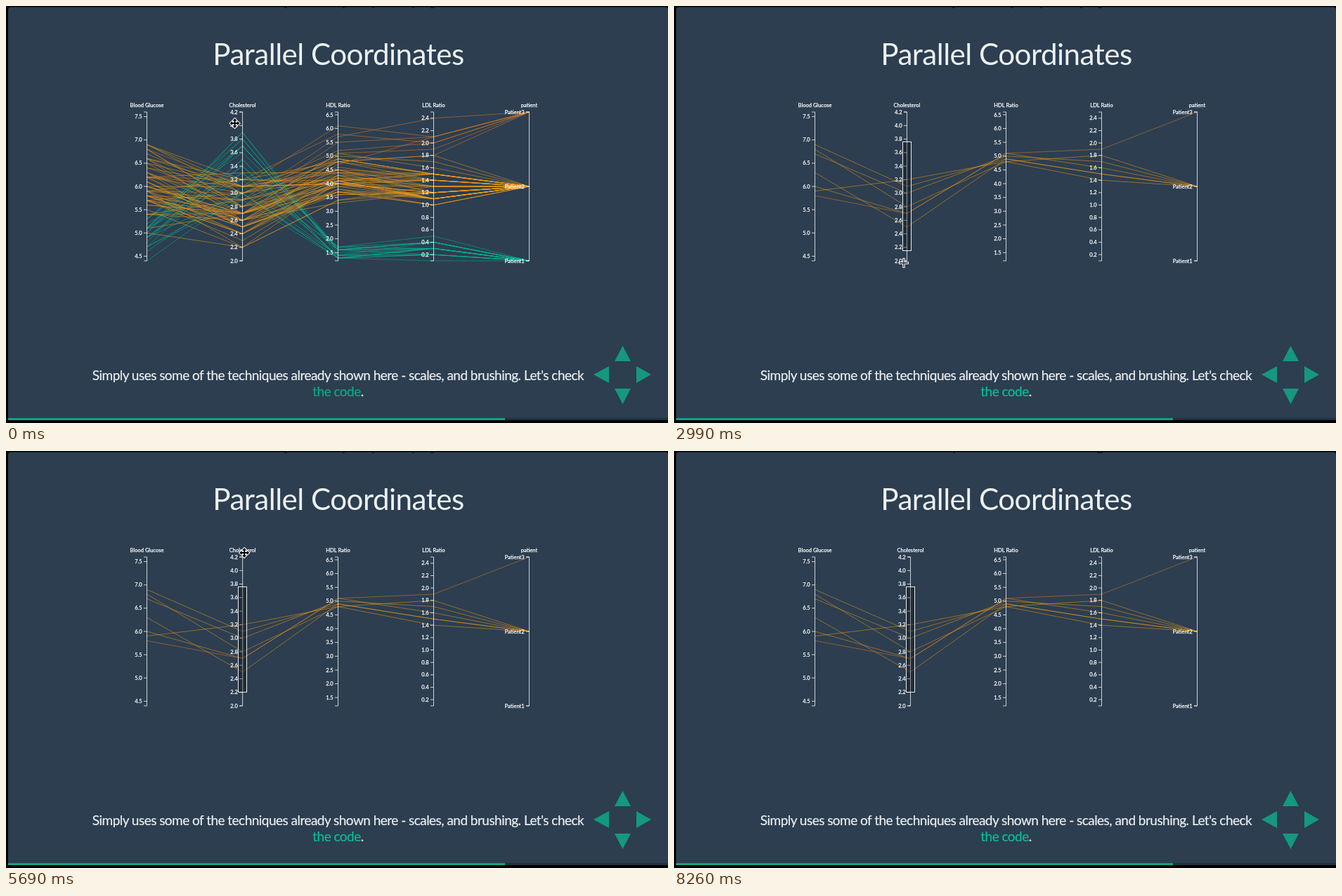
Animation of 942x594 px, one loop 8360 ms. Source, as an HTML page:

```html
<!DOCTYPE html>
<html lang="en">
<head>
<meta charset="utf-8">
<title>Parallel Coordinates</title>
<style>
  html, body { margin: 0; width: 100%; height: 100%; overflow: hidden; background: #000; }
  svg { display: block; width: 942px; height: 594px; font-family: Lato, sans-serif; fill: #fff; }
  .title, .note { letter-spacing: -.544px; fill: #ecf0f1; text-anchor: middle; }
  .title { font-size: 42.2px; }
  .note { font-size: 19.05px; stroke: #ecf0f1; stroke-width: .2; }
  .axis { font-size: 7.56px; text-anchor: end; }
  .axis text { stroke: #fff; stroke-width: .25; }
  .axis .name { text-anchor: middle; }
  .axis path { fill: none; stroke: #fff; stroke-opacity: .85; stroke-width: .9; }
  .lines path { fill: none; stroke-width: .76; stroke-opacity: .68; }
  .brush { fill: #000; fill-opacity: .3; stroke: #fff; stroke-opacity: .9; shape-rendering: crispEdges; }
  .nav { fill: #15987f; }
  .scrap { fill: none; stroke: #0b1017; stroke-width: 1; }
</style>
</head>
<body>
<svg viewBox="0 0 942 594">
  <rect x="3" y="1.5" width="939" height="588.5" rx="4" fill="#2c3e50"/>
  <path id="scrapA" class="scrap" d="M396 2.5h4M479 2.5h3M521 2.5h3M578 2.5h3M604 2.5h5"/>
  <path id="scrapB" class="scrap" d="M397 2.5h3M602 2.5h8"/>
  <path d="M3 587H942V590H3Z" fill="#222f3d"/>
  <path d="M3 587H710V590H3Z" fill="#16a085"/>
  <text class="title" x="473" y="84">Parallel Coordinates</text>
  <g id="lines" class="lines"></g>
  <g id="axes"></g>
  <text class="note" x="472.5" y="533">Simply uses some of the techniques already shown here - scales, and brushing. Let's check</text>
  <text class="note" x="472.5" y="556"><tspan id="link">the code</tspan>.</text>
  <path class="nav" d="M877.5 484L889 506H866ZM877.5 567L889 545H866ZM836 525L858 513V537ZM918 525L897 513V537Z"/>
  <g id="cursor">
    <path id="move" fill="#000" stroke="#fff" stroke-width="2" paint-order="stroke" stroke-linejoin="round"
      d="M0-7L3-3.6H1V-1H3.6V-3L7 0L3.6 3V1H1V3.6H3L0 7L-3 3.6H-1V1H-3.6V3L-7 0L-3.6-3V-1H-1V-3.6H-3Z"/>
    <g id="cross" fill="none">
      <path d="M0-7V7M-7 0H7" stroke="#fff" stroke-width="3.4"/>
      <path d="M0-6V6M-6 0H6" stroke="#1c2732" stroke-width="1.3"/>
    </g>
    <path id="arrow" fill="#000" stroke="#fff" d="M0 0V14L3.2 11L5.6 16.4L8 15.3L5.7 10.2H10Z"/>
  </g>
</svg>
<script>
const LOOP = 8360, TOP = 151, BOTTOM = 363, HOME = 336.5;
const BRUSH_TOP = 193, BRUSH_MAX = 348, BRUSH_LAG = 104, LINE_LAG = 60;
const FILTERED = 1120, RESIZED = 4560;
const $ = id => document.getElementById(id);
const clamp = (v, lo, hi) => Math.min(hi, Math.max(lo, v));

function add(parent, tag, attrs, text) {
  const el = document.createElementNS("http://www.w3.org/2000/svg", tag);
  for (const k in attrs) el.setAttribute(k, attrs[k]);
  if (text) el.textContent = text;
  return parent.appendChild(el);
}

// name, domain, first tick, tick step
const dims = [
  ["Blood Glucose", 4.4, 7.6, 4.5, .5],
  ["Cholesterol", 2, 4.2, 2, .2],
  ["HDL Ratio", 1.2, 6.6, 1.5, .5],
  ["LDL Ratio", .1, 2.5, .2, .2],
  ["patient", 1, 3, 1, 1]
];
const xs = dims.map((d, i) => 200.5 + 136 * i);
const yOf = (i, v) => BOTTOM - (v - dims[i][1]) / (dims[i][2] - dims[i][1]) * (BOTTOM - TOP);

let seed = 11;
const rnd = () => (seed = (seed * 16807) % 2147483647) / 2147483647;

// Rows spread evenly over the given ranges, with jitter
function group(n, patient, ranges) {
  return Array.from({ length: n }, (_, i) => {
    const size = i / (n - 1);
    const row = ranges.map(([lo, hi]) => Math.round((lo + (hi - lo) * (size + rnd()) / 2) * 10) / 10);
    return [...row, patient];
  });
}
// Rows that stay after filtering
const kept = [
  [5.9, 3.2, 4.8, 1.8, 2], [6.9, 3.1, 4.9, 1.5, 2], [6.7, 3, 5, 1.7, 2], [6.8, 2.8, 4.8, 1.4, 2],
  [6, 2.7, 5.1, 1.6, 2], [6.3, 2.5, 4.9, 1.5, 2], [5.8, 2.7, 5.1, 1.9, 3]
];
const rows = [
  ...group(21, 1, [[4.4, 5.5], [2.7, 4.2], [1.2, 1.8], [.1, .5]]),
  ...group(43, 2, [[4.8, 7], [2, 3.4], [3.2, 4.9], [.9, 1.6]]),
  ...group(7, 3, [[4.9, 7.6], [2.5, 3.3], [4.5, 6.6], [1.7, 2.5]]),
  ...kept
];
const colors = ["", "#00b894", "#f39c12", "#e67e22"];
const lines = rows.map(row => ({
  row,
  stays: kept.includes(row),
  y: yOf(1, row[1]),
  el: add($("lines"), "path", { stroke: colors[row[4]] })
}));

const axes = dims.map(([name, lo, hi, first, step], i) => {
  const g = add($("axes"), "g", { class: "axis", transform: `translate(${xs[i]})` });
  let d = `M-4.5 ${TOP}H0V${BOTTOM}H-4.5`;
  for (let v = first; v <= hi + .001; v += step) {
    const y = yOf(i, v);
    d += `M-4.5 ${y}H0`;
    add(g, "text", { x: -6.8, y: y + 2.6 }, i < 4 ? v.toFixed(1) : "Patient" + v);
  }
  add(g, "path", { d });
  add(g, "text", { class: "name", x: 0, y: 144 }, name);
  return g;
});
const brush = add(axes[1], "rect", { class: "brush", x: -6, y: BRUSH_TOP, width: 12 });

// Pointer glides: start, end, x, y
const glides = [
  [0, 210, 335, 167], [590, 830, 332, 163], [1120, 1440, 332, 193], [1440, 2270, 340, 352],
  [2270, 2810, 338, 366], [2900, 3250, 295.5, 366], [3600, 3900, 337, 349], [4320, RESIZED, 340, 343],
  [RESIZED, 5150, 334, 145], [5390, 5690, 339, 145], [5690, 6250, 424, 146], [6450, 6540, 445, 150],
  [6540, 7330, 912, 404]
];
function pointer(t) {
  let x = 325.5, y = 167;
  for (const [a, b, toX, toY] of glides) {
    const p = clamp((t - a) / (b - a), 0, 1);
    x += (toX - x) * p;
    y += (toY - y) * p;
  }
  return { x, y };
}

// Axis follows the pointer while held, then eases home
const drags = [[1440, 3600], [4320, RESIZED], [5690, 6432]];
function axisX(t, lag = 0) {
  const drag = drags.filter(d => t >= d[0]).pop();
  if (!drag) return HOME;
  const [grab, drop] = drag;
  const shift = pointer(Math.min(t, drop)).x - pointer(grab).x;
  const p = clamp((t - drop - lag) / 500, 0, 1);
  const ease = p < .5 ? 4 * p ** 3 : 1 - 4 * (1 - p) ** 3;
  return HOME + shift * (1 - ease);
}

const show = (el, on) => el.style.display = on ? "" : "none";

function draw(t) {
  const x = axisX(t), lineX = axisX(t, LINE_LAG);
  const end = clamp(pointer(Math.min(t - BRUSH_LAG, RESIZED)).y, BRUSH_TOP, BRUSH_MAX);
  const brushed = end > BRUSH_TOP;
  axes[1].setAttribute("transform", `translate(${x})`);
  show(brush, brushed);
  brush.setAttribute("height", end - BRUSH_TOP);

  for (const { row, stays, y, el } of lines) {
    const on = t < FILTERED || stays && (!brushed || y >= BRUSH_TOP && y <= end);
    show(el, on);
    if (on) el.setAttribute("d", "M" + row.map((v, i) => `${i === 1 ? lineX : xs[i]} ${yOf(i, v)}`).join("L"));
  }

  const kind = t >= 6540 ? "arrow" : t < 60 || t >= 3600 ? "move" : "cross";
  for (const id of ["move", "cross", "arrow"]) show($(id), id === kind);
  const at = pointer(t);
  show($("cursor"), t < 7330);
  $("cursor").setAttribute("transform", `translate(${at.x} ${at.y})`);

  $("link").style.fill = $("link").style.stroke = t < 1200 ? "#10a888" : "#0fbc9a";
  show($("scrapA"), t < 8260);
  show($("scrapB"), t >= 8260);
}

const begin = performance.now();
function tick() {
  draw((performance.now() - begin) % LOOP);
  requestAnimationFrame(tick);
}
tick();
</script>
</body>
</html>
```
